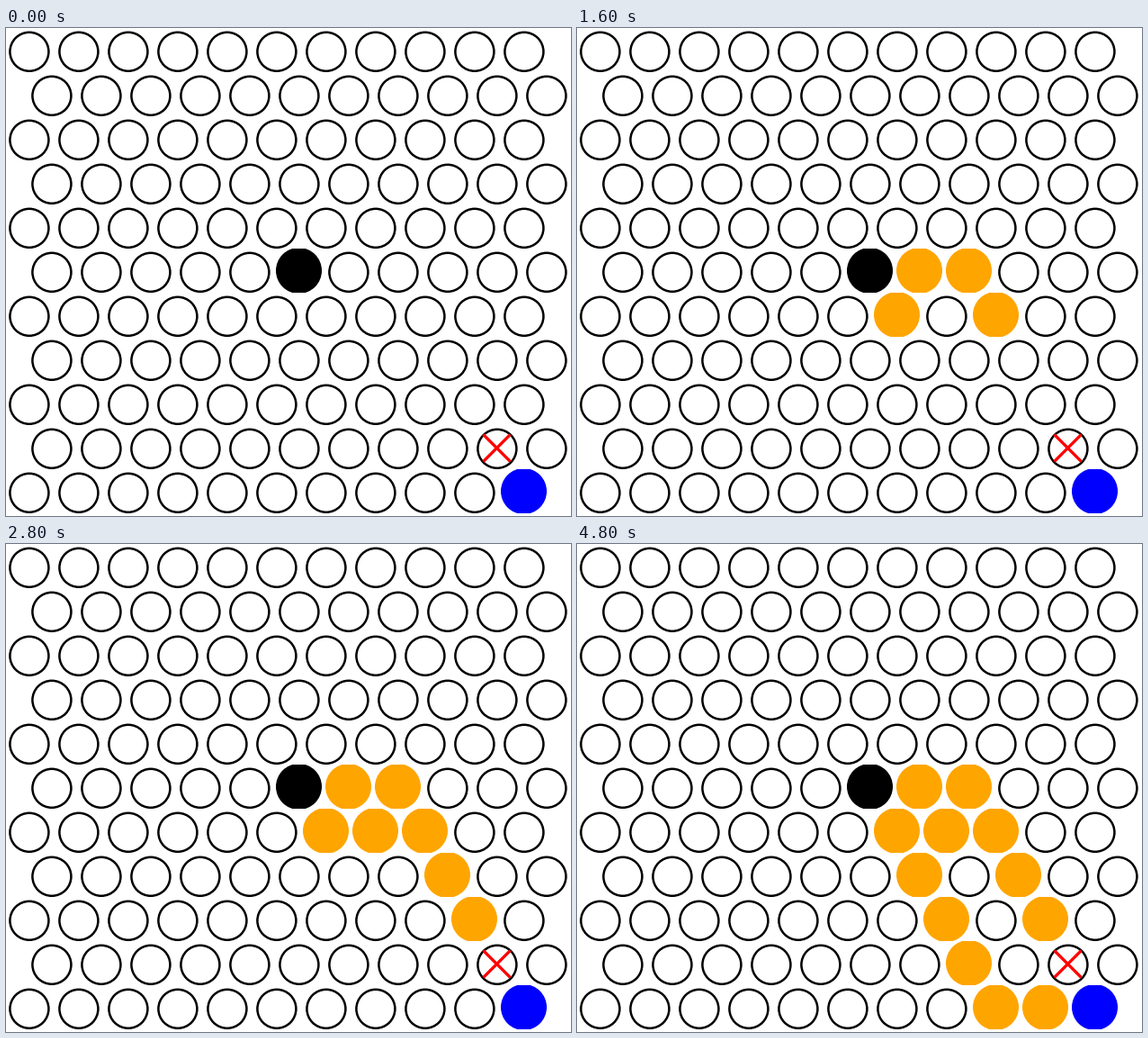
A matplotlib script for the animation above (5200 ms loop, 628 by 542 pixels).

```python
import matplotlib.pyplot as plt
from matplotlib.animation import FuncAnimation
from matplotlib.patches import Circle, Rectangle

W, H, DPI = 628, 542, 100
PX = 72 / DPI
ROWS = COLS = 11
PITCH_X, PITCH_Y = 55, 49

START, GOAL, BLOCKED = (5, 5), (10, 10), (9, 9)
# Cells (row, column) in the order they are visited, one per step
VISITED = [(5, 6), (6, 6), (5, 7), (6, 8), (7, 8), (8, 9),
           (6, 7), (7, 6), (8, 7), (9, 7), (10, 8), (10, 9)]

fig = plt.figure(figsize=(W / DPI, H / DPI), dpi=DPI, facecolor="white")
ax = fig.add_axes([0, 0, 1, 1])
ax.set_xlim(0, W)
ax.set_ylim(H, 0)
ax.axis("off")


def center(row, col):
    return 25.5 + 25 * (row % 2) + PITCH_X * col, 24.5 + PITCH_Y * row


def add_ring(row, col):
    x, y = center(row, col)
    ring = Circle((x + 0.4, y + 1.8), 21.5, fill=False, ec="black", lw=2.5 * PX)
    return ax.add_patch(ring)


def add_disc(row, col, color):
    """Disc cut flat at the top and bottom of its row."""
    x, y = center(row, col)
    disc = ax.add_patch(Circle((x, y), 25.5, fc=color, lw=0, zorder=3))
    band = Rectangle((0, PITCH_Y * row), W, PITCH_Y, transform=ax.transData)
    disc.set_clip_path(band)
    return disc


def add_cross(row, col, half=15):
    x, y = center(row, col)
    y += 1
    for s in (1, -1):
        ax.plot([x - half, x + half], [y - s * half, y + s * half], color="red",
                lw=3.3 * PX, solid_capstyle="butt", zorder=4)


rings = {(r, c): add_ring(r, c) for r in range(ROWS) for c in range(COLS)}
discs = [add_disc(*cell, "orange") for cell in VISITED]
for cell, color in ((START, "black"), (GOAL, "blue")):
    add_disc(*cell, color)
    rings[cell].set_visible(False)
add_cross(*BLOCKED)


def update(step):
    for i, (cell, disc) in enumerate(zip(VISITED, discs)):
        disc.set_visible(i < step)
        rings[cell].set_visible(i >= step)
    return discs


anim = FuncAnimation(fig, update, frames=len(VISITED) + 1, interval=400,
                     init_func=lambda: update(0), repeat=True, repeat_delay=0)
plt.show()
```
